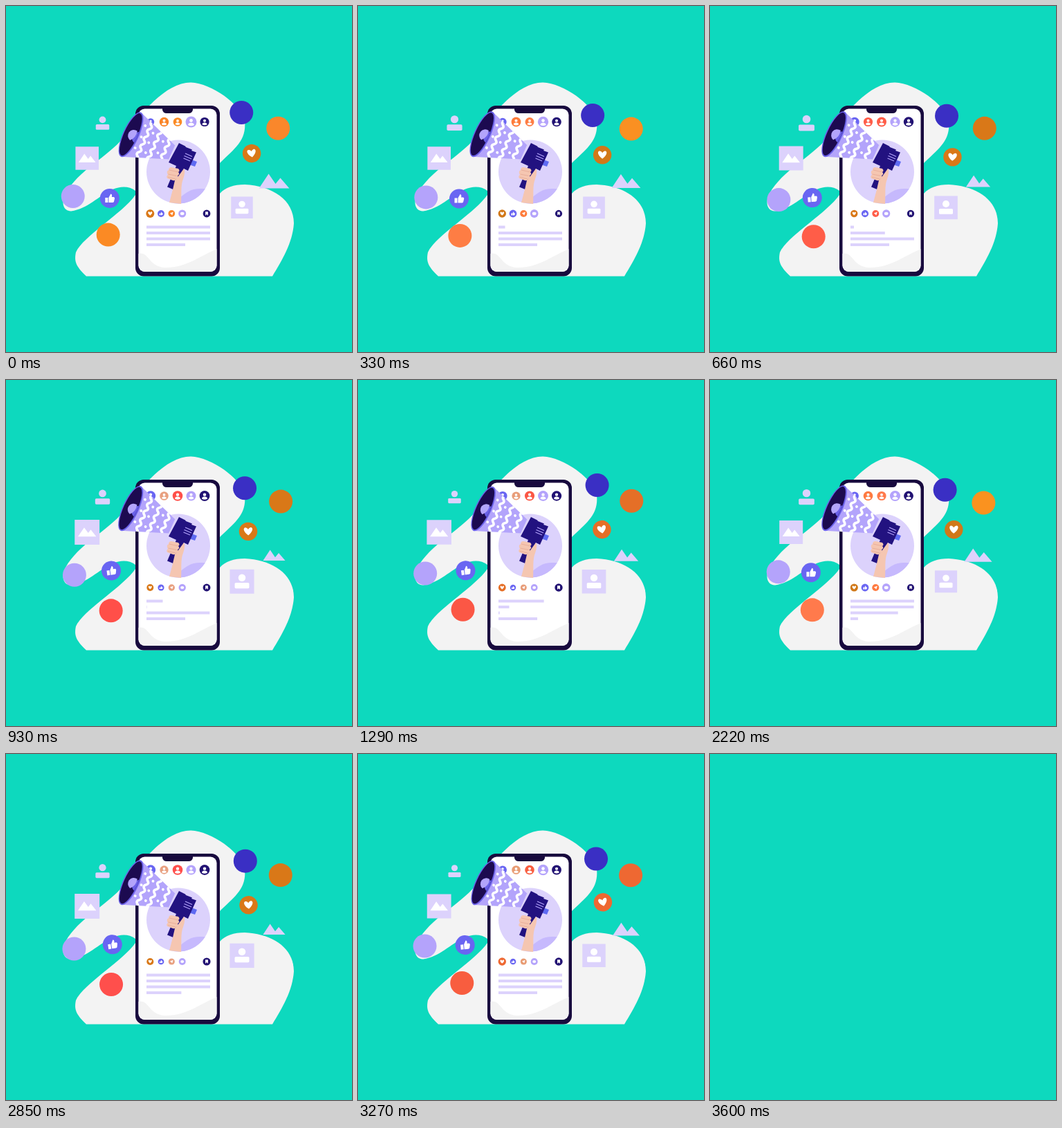
Animation, 500 px wide and 500 px high, one loop 3.63 s. Source, as an HTML page:

```html
<!DOCTYPE html>
<html lang="en">
<head>
<meta charset="utf-8">
<style>
html, body { margin: 0; width: 100%; height: 100%; overflow: hidden; background: #0dd9be; }
svg { display: block; width: 100vw; height: 100vh; }
</style>
</head>
<body>
<svg viewBox="0 0 500 500">
  <defs>
    <clipPath id="photo"><circle cx="249" cy="239.5" r="46"/></clipPath>
    <clipPath id="cone"><path d="M0-35L64-12V10L0 35Q11 0 0-35Z"/></clipPath>
    <clipPath id="screen"><rect x="191.5" y="148.5" width="113" height="235.5" rx="9"/></clipPath>
  </defs>
  <g id="scene">
    <path fill="#f3f3f3" d="M267 110.5C298 112 339 142 345 166C348 195 330 206 309 227L290 250L309 271C317 262 329 258 345 258C385 260 416 280 416 314C414 343 399 367 385 390.5H116C102 377 98 370 101 356C111 333 168 300 187 273V267C178 260 166 260 154 265C133 275 118 293 94 296.500C83 296 79 285 86 271C105 237 146 219 170 190C195 155 230 111 267 110.500Z"/>
    <rect x="187" y="144" width="122" height="246.500" rx="12" fill="#180a3e"/>
    <g clip-path="url(#screen)">
      <path fill="#fff" d="M191 148h114v237H191z"/>
      <path fill="#f3f3f3" d="M191 358C207 354 205 376 229 378C259 379 281 361 305 351V386H191Z"/>
    </g>
    <path fill="#180a3e" d="M226 147H270V150Q269 155 264 155H232Q227 155 226 150Z"/>
    <g clip-path="url(#photo)">
      <path fill="#dcd2fc" d="M200 190h98v98h-98z"/>
      <path fill="#c6b9fd" d="M228 290C242 289 250 276 262 269C274 262 284 264 300 266V290Z"/>
    </g>
    <g id="lines" fill="#dcd2fc"></g>
    <g id="icons"></g>

    <path fill="#5f6bf2" d="M268 222L276 225L273 232L264 229Z"/>
    <path fill="#221280" d="M250 198L259 202.500L260 204L269 207.500L268 209L275 211.500L263 238L257 235L244 266L233 261.500L246 231L235 226Z"/>
    <path stroke="#b3a4fb" stroke-width="1.200" d="M259 213L269 217.500M257.500 216.500L268 221M256.500 220L266 224"/>
    <path fill="#f5c6b1" d="M249 246L257 235Q260 238 256 250C252 260 254 271 253 286L236 284C240 270 242 261 244 252Z"/>
    <path fill="#f5c6b1" d="M235 237Q235 233 239 233L249 235Q252 238 249 240Q252 243 248 245Q250 248 246 250Q245 253 241 252L233 249Q231 246 234 244Q231 239 235 237Z"/>
    <path stroke="#e3a491" stroke-width=".7" fill="none" d="M236 237L249 240M234.500 243L247 245.500M234 247.500L245 250"/>

    <g id="horn">
      <g transform="translate(181 186) rotate(24.400)">
        <path fill="#b3a4fb" d="M0-35L64-12V10L0 35Z"/>
        <g id="pattern" clip-path="url(#cone)"></g>
        <ellipse rx="11.500" ry="35" fill="#6a60e8"/>
        <ellipse cx="-.3" rx="9.800" ry="33" fill="#1c0a50"/>
        <path fill="#6a60e8" d="M9 -8A9 9 0 0 0 9 9Q10 0 9-8Z"/>
        <path fill="#b3a4fb" d="M6-8.500A8.500 8.500 0 0 0 2 8Q9 1 6-8.500Z"/>
      </g>
    </g>
  </g>
</svg>
<script>
const LOOP = 3630, SHOWN = 3600, CYCLE = 1800;
const $ = id => document.getElementById(id);
const svgGroup = (parent, markup) => {
  const g = document.createElementNS('http://www.w3.org/2000/svg', 'g');
  g.innerHTML = markup;
  return parent.appendChild(g);
};

// A wave is [mean, amplitude, phase in degrees]; a plain number stays fixed.
const wave = (w, deg) => w.length ? w[0] + w[1] * Math.cos((deg - w[2]) * Math.PI / 180) : w;

const stops = [0, 84, 132, 186, 210, 324, 360];
const palettes = {
  warm: ['fb8a24', 'ff7a4c', 'ff5d48', 'ff4f49', 'ff4f4c', 'f5623b'],
  amber: ['fa872b', 'fa921f', 'd97818', 'd97818', 'd97818', 'f5623b'],
  gold: ['d97818', 'd07818', 'd97818', 'd97818', 'd97818', 'f5623b'],
  peach: ['fa8528', 'ff7a40', 'ff5d49', 'e8a080', 'e8a080', 'e89a70']
};
function tint(list, deg) {
  const i = stops.findIndex(s => s > deg) - 1;
  const k = (deg - stops[i]) / (stops[i + 1] - stops[i]);
  const rgb = j => list[j % 6].match(/../g).map(h => parseInt(h, 16));
  const end = rgb(i + 1);
  return `rgb(${rgb(i).map((v, c) => Math.round(v + (end[c] - v) * k))})`;
}

const white = d => `<path fill="#fff" d="${d}"/>`;
const disc = r => `<circle r="${r}"/>`;
const heart = white('M0 5.500C-9-1-6.500-7-3-5.500Q-1-5 0-3Q1-5 3-5.500C6.500-7 9-1 0 5.500Z');
const thumb = white('M-6.500-1H-2.500V6H-6.500ZM-1.500-1L1.500-6.500Q4-6 3-2H6Q8-1 7 1L6 5Q5.500 6 4 6H-1.500Z');
const person = '<circle cy="-4.500" r="4.800"/><rect x="-9.500" y="2" width="19" height="7.500" rx="1.500"/>';
const peaks = 'M-22 9.500L-8-11.500L2 3L9-5.500L22 9.500Z';
const small = (mark, k) => disc(10) + `<g transform="scale(${k})">${mark}</g>`;
const avatar = disc(10) + '<circle cy="-2.500" r="3" fill="#fff"/>' + white('M-5.500 5.500Q-5 1.500 0 1.500T5.500 5.500Q0 9 -5.500 5.500Z');

const icons = [];
function icon(markup, fill, x, y, scale = 1, turn = 0) {
  icons.push({ g: svgGroup($('icons'), markup), fill, x, y, scale, turn });
}
const PALE = '#dcd2fc', LILAC = '#b4a3fb', VIOLET = '#6965f2', NAVY = '#221273';

icon(disc(17), '#3a2fc4', [342.5, 3.5, 230], [155.3, 3.8, 110]);
icon(disc(17), 'amber', [395.2, 2, 170], [176.2, 1.4, 70]);
icon(disc(13.2) + heart, 'gold', [352.5, 2.6, -10], [216, -3, -10], 1, [-5, 8, 120]);
icon(disc(14) + thumb, VIOLET, [150.7, 4.8, 260], [276.8, 1.7, 50], 1, [-4, 5, 40]);
icon(disc(17), LILAC, [97.9, 1.5, 140], [278.3, 3.4, 190]);
icon(disc(17), 'warm', [149.6, 2.5, 220], [332, 1.5, 160]);
icon(`<path d="${peaks}"/>`, PALE, 387.5, 254, [.864, .136, 15]);
icon(person, PALE, 139.5, 169, [1.08, .13, 115]);
icon('<path d="M-17-17H17V17H-17Z"/>' + white('M-12.500 6L-4-6.500L1.500 1L5-3.500L12.500 6Z'),
  PALE, 117.2, 220, [1.02, -.038, 30]);
icon(`<path d="M-16-16H16V16H-16Z"/><g fill="#fff" transform="translate(0 -.5)">${person}</g>`,
  PALE, 341, 291.3, [1.04, -.062, 30]);

icon(avatar, VIOLET, 209, 167.5, [.62, -.1, 10]);
icon(avatar, 'peach', 228.5, 167.5, [.65, .04, 60]);
icon(avatar, 'warm', 248, 167.5, [.68, -.05, 20]);
icon(avatar, LILAC, 267.5, 167.5, [.75, .05, 0]);
icon(avatar, NAVY, 287, 167.5, [.7, -.04, 10]);

icon(small(heart, .8), 'gold', 208.3, 300, [.55, .05, 0]);
icon(small(thumb, .75), VIOLET, 224, 300, [.48, .06, 75]);
icon(disc(10) + white('M-5-1L5-5L2 5L-1 2Z'), 'peach', 239.3, 300, [.48, .03, 75]);
icon(disc(10) + '<ellipse rx="5" ry="4" fill="#fff"/>', LILAC, 254.7, 300, [.54, .05, 70]);
icon(disc(10) + white('M-3.500-5H3.500V5L0 2L-3.500 5Z'), NAVY, 290, 300, [.54, -.03, 90]);

$('pattern').innerHTML = [21, 37, 54].map(x => {
  let d = `M${x} -36`;
  for (let y = -36, side = 1; y < 36; y += 6, side = -side) d += `q${side * 4} 3 0 6`;
  return `<path d="${d}" fill="none" stroke="#fff" stroke-width="3.600"/>`;
}).join('') + [[13.5, -20], [15, -3], [13.5, 15], [28, -15], [28, 0], [30, 15], [46, -10], [46, 8]]
  .map(([x, y]) => `<circle cx="${x}" cy="${y}" r="1.900" fill="#fff"/>`).join('');

const lines = [92, 92, 92, 56].map((full, i) => {
  const bar = svgGroup($('lines'), `<rect x="203" y="${317.5 + i * 8.5}" height="4"/>`).firstChild;
  return { bar, full, start: i * 450 };
});

// Cubic ease-in-out with both handles at one half.
function ease(x) {
  if (x <= 0) return 0;
  if (x >= 1) return 1;
  let lo = 0, hi = 1;
  for (let i = 0; i < 20; i++) {
    const s = (lo + hi) / 2;
    if (1.5 * s * (1 - s) + s ** 3 < x) lo = s; else hi = s;
  }
  return lo * lo * (3 - 2 * lo);
}

function draw(t) {
  $('scene').style.display = t < SHOWN ? '' : 'none';
  const deg = t % CYCLE / CYCLE * 360;
  for (const { g, fill, x, y, scale, turn } of icons) {
    g.setAttribute('transform',
      `translate(${wave(x, deg)} ${wave(y, deg)}) rotate(${wave(turn, deg)}) scale(${wave(scale, deg)})`);
    g.setAttribute('fill', palettes[fill] ? tint(palettes[fill], deg) : fill);
  }
  for (const { bar, full, start } of lines) {
    const s = t - start;
    bar.setAttribute('width', full * Math.max(1 - ease(s / 440), ease((s - 390) / 1470)));
  }
  $('horn').setAttribute('transform',
    `translate(245 222) scale(${wave([1.01, .014, 105], deg)}) translate(-245 -222)`);
}

const begin = performance.now();
function tick() {
  draw((performance.now() - begin) % LOOP);
  requestAnimationFrame(tick);
}
tick();
</script>
</body>
</html>
```
